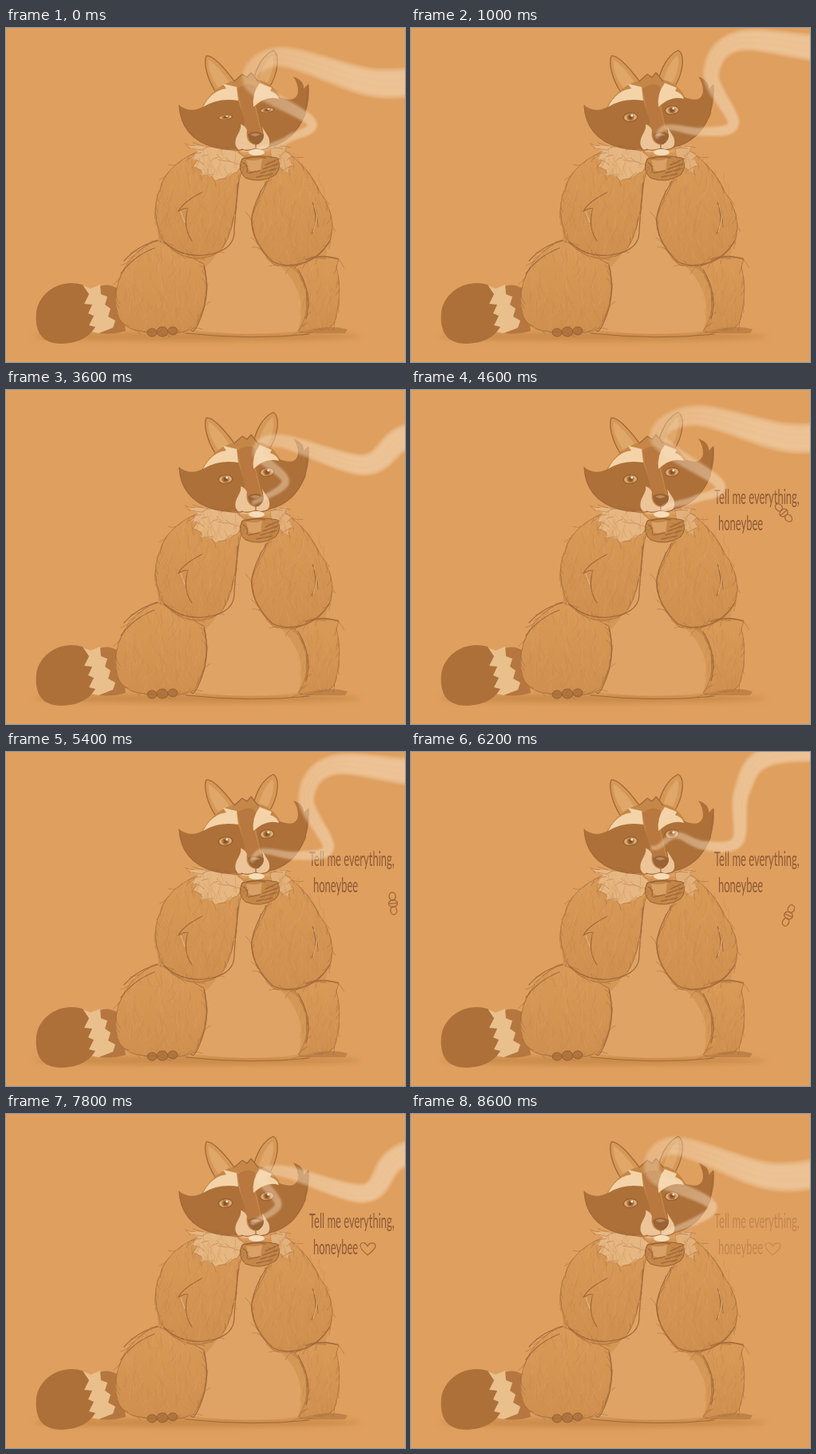
An HTML page that plays this animation: 500x419 px, repeating every 8.8 s.

```html
<!DOCTYPE html>
<html lang="en">
<head>
<meta charset="utf-8">
<title>Raccoon with a hot cup</title>
<style>
html, body { margin: 0; height: 100%; overflow: hidden; background: #df9f5e; }
svg { display: block; width: 500px; height: 419px; }
.line { fill: none; stroke: #a1683a; stroke-linecap: round; stroke-linejoin: round; }
.fur { fill: url(#coat); stroke: #b87d44; stroke-width: 1; }
.dark { fill: #ad7039; }
.light { fill: #f4d3a8; }
#note text { font: 13px Lato, "Open Sans", sans-serif; fill: #8d5a36; }
</style>
</head>
<body>
<svg viewBox="0 0 500 419">
  <defs>
    <linearGradient id="mist" gradientUnits="userSpaceOnUse" x1="290" y1="0" x2="440" y2="0">
      <stop offset="0" stop-color="#f6dcbc" stop-opacity=".18"/>
      <stop offset="1" stop-color="#f6dcbc" stop-opacity=".34"/>
    </linearGradient>
    <linearGradient id="coat" x1="0" y1="0" x2="0" y2="1">
      <stop offset="0" stop-color="#d99a58"/><stop offset="1" stop-color="#cf8f4e"/>
    </linearGradient>
    <filter id="soft" x="-20%" y="-20%" width="140%" height="140%"><feGaussianBlur stdDeviation="1"/></filter>
    <filter id="blur" x="-20%" y="-90%" width="140%" height="280%"><feGaussianBlur stdDeviation="3"/></filter>
  </defs>
  <rect width="500" height="419" fill="#df9f5e"/>
  <ellipse cx="240" cy="387" rx="205" ry="6" fill="#cb8c4b" filter="url(#blur)"/>

  <g id="tail">
    <path fill="#b5773f" d="M112 326Q128 318 142 328L150 380Q130 386 112 382Z"/>
    <path fill="#e9bf8c" d="M94 322L106 327 118 322 119 334 127 337 124 347 131 352 128 362 137 367 134 376 116 383 103 380Z"/>
    <path class="dark" d="M96 322C70 314 42 330 38 356C36 378 42 396 70 396C92 395 104 388 112 375L104 373 110 361 103 358 108 347 98 346 104 334Z"/>
  </g>

  <path d="M250 160C206 190 186 220 189 255L230 382 385 384 405 260C405 215 388 180 350 155Z" fill="#d59755"/>
  <path d="M291 184C290 230 270 285 250 300C254 330 246 360 236 379Q300 388 366 380C378 345 362 315 345 300C322 270 326 220 332 186Z" fill="#dfa365"/>

  <g id="legs">
    <path class="fur" d="M190 266C160 278 140 305 138 335C136 360 143 374 162 379C190 386 224 384 236 376C252 350 254 320 248 296Z"/>
    <path class="fur" d="M374 290Q400 285 417 290L414 300C421 325 417 352 411 371C400 381 380 384 366 380C384 355 378 322 362 300Z"/>
  </g>
  <g fill="#b0743e" stroke="#96602f">
    <ellipse cx="183" cy="382" rx="6" ry="5"/><ellipse cx="196" cy="381" rx="7" ry="6"/><ellipse cx="209" cy="380" rx="6" ry="5"/>
  </g>
  <path d="M366 383Q400 370 428 378L425 383Z" fill="#bf8247"/>

  <g id="arms">
    <path class="fur" d="M240 155C214 166 199 182 194 200C184 220 186 240 195 264C212 290 246 296 268 280C284 262 287 230 292 193L296 172Z"/>
    <path class="fur" d="M350 155C370 168 383 184 392 204C406 222 414 248 405 268C394 292 362 304 336 297C316 278 305 256 309 236C314 216 324 205 330 187Z"/>
  </g>
  <g class="line" stroke-width="1.2">
    <path d="M198 268Q222 290 255 284T286 252L291 194"/>
    <path d="M405 268C385 300 350 302 334 293C314 274 306 252 308 236Q312 216 327 192"/>
    <path d="M246 206Q222 218 216 230Q222 226 228 226Q221 250 233 267"/>
    <path d="M384 219L389 231 391 250M383 258Q391 243 386 226"/>
    <path d="M248 298Q256 330 246 358T232 379M366 303Q385 335 376 365"/>
    <path d="M190 267Q166 272 148 292M186 276Q160 286 144 308M376 291Q396 282 416 290"/>
    <path stroke-width="1" d="M226 383Q310 392 380 384"/>
  </g>
  <path fill="none" stroke="#f0c998" stroke-opacity=".7" d="M219 230L224 244M386 222L390 236 385 256"/>

  <g id="ruff">
    <path fill="#e6b782" d="M226 147L240 154 232 164 240 166 235 174 246 178 243 184 258 186 262 191 274 188 290 180 298 162 282 150Z"/>
    <path fill="#e2b07a" d="M330 152L352 146 350 154 358 160 354 164 360 172 354 174 354 182 344 176 334 168Z"/>
  </g>

  <g id="head">
    <path fill="#d79856" stroke="#a1683a" stroke-width="1.3" d="M262 79C253 65 247 45 251 35Q262 34 287 68ZM309 72C312 50 323 33 335 28C344 34 341 58 329 76Z"/>
    <path fill="#dfa769" d="M266 75Q252 55 254 40Q266 48 280 68ZM316 68Q321 46 334 34Q338 50 327 70Z"/>
    <path fill="#c58747" d="M246 98Q262 72 286 66L296 58 303 61 308 56 315 65Q336 68 346 92L330 148 290 152Z"/>
    <path class="dark" d="M248 98Q232 108 217 97C218 122 232 142 262 150Q284 154 296 151L300 118 290 88Q268 88 248 98Z"/>
    <path class="dark" d="M313 97Q332 82 346 88Q364 94 366 80Q366 69 360 61Q374 66 373 76L379 70Q382 86 375 108C366 132 352 145 326 150L319 124Z"/>
    <path fill="#b8783f" d="M290 76Q304 66 313 74L311 96 320 134 303 136 295 100Z"/>
    <path class="light" d="M247 99Q258 78 276 76L272 70 289 74 291 91Q266 87 247 99Z"/>
    <path class="light" d="M310 99Q308 82 318 69L333 75 331 79Q340 82 342 89Q326 84 310 99Z"/>
    <path fill="#ecc497" d="M294 121C296 130 285 136 288 148Q292 157 304 155L314 151 324 153Q333 148 329 137L321 124Q326 143 313 147Q299 144 302 128Q298 121 294 121Z"/>
    <path fill="#9a6335" d="M303 133Q312 127 323 133Q324 141 316 146Q304 146 303 133Z"/>
    <path fill="#c28a59" d="M306 134Q312 130 319 134L312 136Z"/>
    <path class="line" stroke-width="1.2" d="M217 97C218 122 232 142 262 150Q282 154 296 153M313 146L313 151Q302 155 295 152M313 151Q322 155 330 149Q360 143 375 108L379 72M286 67L296 58 302 62 307 56 316 67"/>
    <g class="eye" data-at="275 112"></g>
    <g class="eye" data-at="327 103"></g>
  </g>

  <g id="cup">
    <path fill="#c58748" stroke="#96602f" d="M296 164Q316 158 340 163Q346 174 338 184Q320 196 300 188Q289 178 296 164Z"/>
    <ellipse cx="314" cy="156" rx="10" ry="4" fill="#f6dcb8"/>
    <path fill="#d9a166" d="M301 165Q312 168 321 164L319 178Q310 182 304 178Z"/>
    <path class="line" stroke-width="1.4" d="M297 169Q304 172 302 181M301 164Q313 160 325 163M342 164L325 172M342 170L322 177M340 176L319 182M334 183L314 187M304 182L318 179"/>
  </g>
  <g id="hair" class="line" opacity=".45"></g>

  <g id="note">
    <g transform="translate(380 143) scale(1 1.9)"><text>Tell me everything,</text></g>
    <g transform="translate(385 176) scale(1 1.9)"><text>honeybee</text></g>
    <path id="heart" class="line" stroke-width="1.2" d="M453 177C447 172 443 168 444 164C446 160 451 161 453 166C456 160 463 161 463 166C462 170 457 174 453 177Z"/>
  </g>
  <g id="bee" class="line" stroke-width="1.3">
    <ellipse rx="4.5" ry="5.5"/><ellipse cx="-9" rx="5" ry="4"/><ellipse cx="9" rx="5" ry="4"/><path d="M0 -5V5"/>
  </g>
  <g id="smoke" fill="url(#mist)" filter="url(#soft)"><path/><path/><path fill="none" stroke="#fff0dc" stroke-opacity=".15"/></g>
</svg>
<script>
const $ = s => document.querySelector(s), $$ = s => [...document.querySelectorAll(s)];
const STEP = 200, STEPS = 44, WAVE = 22;

let seed = 7;
const rnd = () => (seed = seed * 16807 % 2147483647) / 2147483647;

// Loose hairs: scattered over a shape's box, or brushed along its outline.
const hairs = [];
function hair(x, y, a, len, color, width) {
  const bend = a + rnd() - .5, { cos, sin } = Math;
  hairs.push(`<path stroke="${color}" stroke-width="${width}" d="M${x} ${y}q${cos(a) * len / 2} ${sin(a) * len / 2} ${cos(bend) * len} ${sin(bend) * len}"/>`);
}
function coat(path) {
  const box = path.getBBox();
  for (let i = 0; i < box.width * box.height / 110; i++) {
    const r = .44 * Math.sqrt(rnd()), t = rnd() * 2 * Math.PI;
    hair(box.x + box.width * (.5 + r * Math.cos(t)), box.y + box.height * (.45 + r * Math.sin(t)),
      1.2 + rnd() * .8, 8 + rnd() * 12, rnd() < .5 ? "#bd8146" : "#e0a868", .7);
  }
}
function fringe(path) {
  for (let s = 0, n = path.getTotalLength(); s < n - 3; s += 5 + 8 * rnd()) {
    const p = path.getPointAtLength(s), q = path.getPointAtLength(s + 2);
    hair(p.x, p.y, Math.atan2(q.y - p.y, q.x - p.x) + rnd() * .8 - .4, 6 + rnd() * 9, "#9c6436", 1);
  }
}
$$(".fur, #ruff path").forEach(p => { coat(p); fringe(p); });
$("#hair").innerHTML = hairs.join("");

const eyes = $$(".eye");
for (const e of eyes) e.innerHTML =
  '<ellipse rx="9.5" ry="6" fill="#96602f"/><ellipse rx="8" ry="4.8" fill="#dcaa74"/>' +
  '<circle r="4.6" fill="#b5763f"/><circle r="2.6" fill="#85522c"/><circle cx="2" cy="-2" r="1.5" fill="#fbe6cb"/>';

// Blend of rows [time, ...values], running on past both ends.
function blend(rows, t) {
  let i = 0;
  while (i < rows.length - 2 && t > rows[i + 1][0]) i++;
  const a = rows[i], b = rows[i + 1], k = (t - a[0]) / (b[0] - a[0]);
  return a.slice(1).map((v, j) => v + (b[j + 1] - v) * k);
}

// Every bend of the smoke drifts along the same three tracks, one wave apart:
// the trough, then the left side and the top of the crest. Rows are [age, x, y].
const trough = [[-22, 320, 151], [-17, 316, 126], [-9, 304, 112], [-1, 378, 117], [5, 404, 120],
  [9, 409, 112], [13, 452, 122], [21, 445, 77], [27, 530, 26]];
const crest = [[-22, 335, 147], [-17, 330, 125], [-9, 335, 84], [-1, 304, 76], [1, 310, 62],
  [5, 376, 58], [13, 453, 42], [21, 520, 74], [27, 640, 10]];
const crown = [[-22, 356, 138], [-17, 365, 130], [-9, 368, 104], [-1, 330, 40], [5, 412, 16],
  [13, 490, -8], [21, 590, 70]];

function spine(step) {
  const p = step % WAVE, sway = Math.cos(2 * Math.PI * p / WAVE);
  const bends = [p - WAVE, p, p + WAVE].flatMap(age => [trough, crest, crown].map(track => blend(track, age)));
  return [[306 + 6 * sway, 135 + 18 * sway], ...bends.slice(0, -1)];
}

// Catmull-Rom samples through the points.
function curve(pts) {
  const out = [], at = i => pts[Math.max(0, Math.min(pts.length - 1, i))];
  for (let i = 0; i < pts.length - 1; i++) for (let u = 0; u < 1; u += 1 / 16) {
    out.push([0, 1].map(d => {
      const [a, b, c, e] = [-1, 0, 1, 2].map(k => at(i + k)[d]);
      return b + .5 * u * (c - a + u * (2 * a - 5 * b + 4 * c - e + u * (3 * (b - c) + e - a)));
    }));
  }
  return out;
}

const smoke = $$("#smoke path");
function drawSmoke(step) {
  const pts = curve(spine(step));
  const side = k => {
    let s = 0;
    return pts.map(([x, y], i) => {
      const p = pts[Math.max(0, i - 1)], q = pts[Math.min(pts.length - 1, i + 1)];
      const dx = q[0] - p[0], dy = q[1] - p[1], len = Math.hypot(dx, dy) || 1;
      s += len / 2;
      const w = k * Math.min(19, 3 + s * .043);
      return `${(x - dy / len * w).toFixed(1)} ${(y + dx / len * w).toFixed(1)}`;
    });
  };
  [1, .8].forEach((k, i) =>
    smoke[i].setAttribute("d", "M" + side(k).concat(side(-k).reverse()).join("L") + "Z"));
  smoke[2].setAttribute("d", [.5, 0, -.45].map(k => "M" + side(k).join("L")).join(""));
}

// Rows are [step, x, y, angle].
const flight = [[20, 515, 128, 10], [23, 467, 154, 48], [26, 488, 182, 80], [30, 476, 214, 100],
  [31, 473, 205, 112], [35, 458, 158, 52], [38, 453, 168, 20]];
const fade = [[18, 0], [22, 1], [40, 1], [43, .36]];

function draw(ms) {
  const step = Math.floor(ms / STEP) % STEPS;
  drawSmoke(step);
  const lid = step < 3 ? .5 : step < WAVE && step % 6 > 3 && step > 8 ? .2 : 1;
  for (const e of eyes) e.setAttribute("transform", `translate(${e.dataset.at}) rotate(-6) scale(1 ${step === 13 ? 1 : lid})`);
  $("#note").setAttribute("opacity", blend(fade, step)[0]);
  $("#heart").setAttribute("opacity", (step - 37) / 2);
  const [x, y, a] = blend(flight, step);
  $("#bee").setAttribute("transform", `translate(${x} ${y}) rotate(${a})`);
  $("#bee").setAttribute("opacity", step > 19 && step < 38 ? 1 : 0);
}

const start = performance.now();
function tick() {
  draw(performance.now() - start);
  requestAnimationFrame(tick);
}
tick();
</script>
</body>
</html>
```
